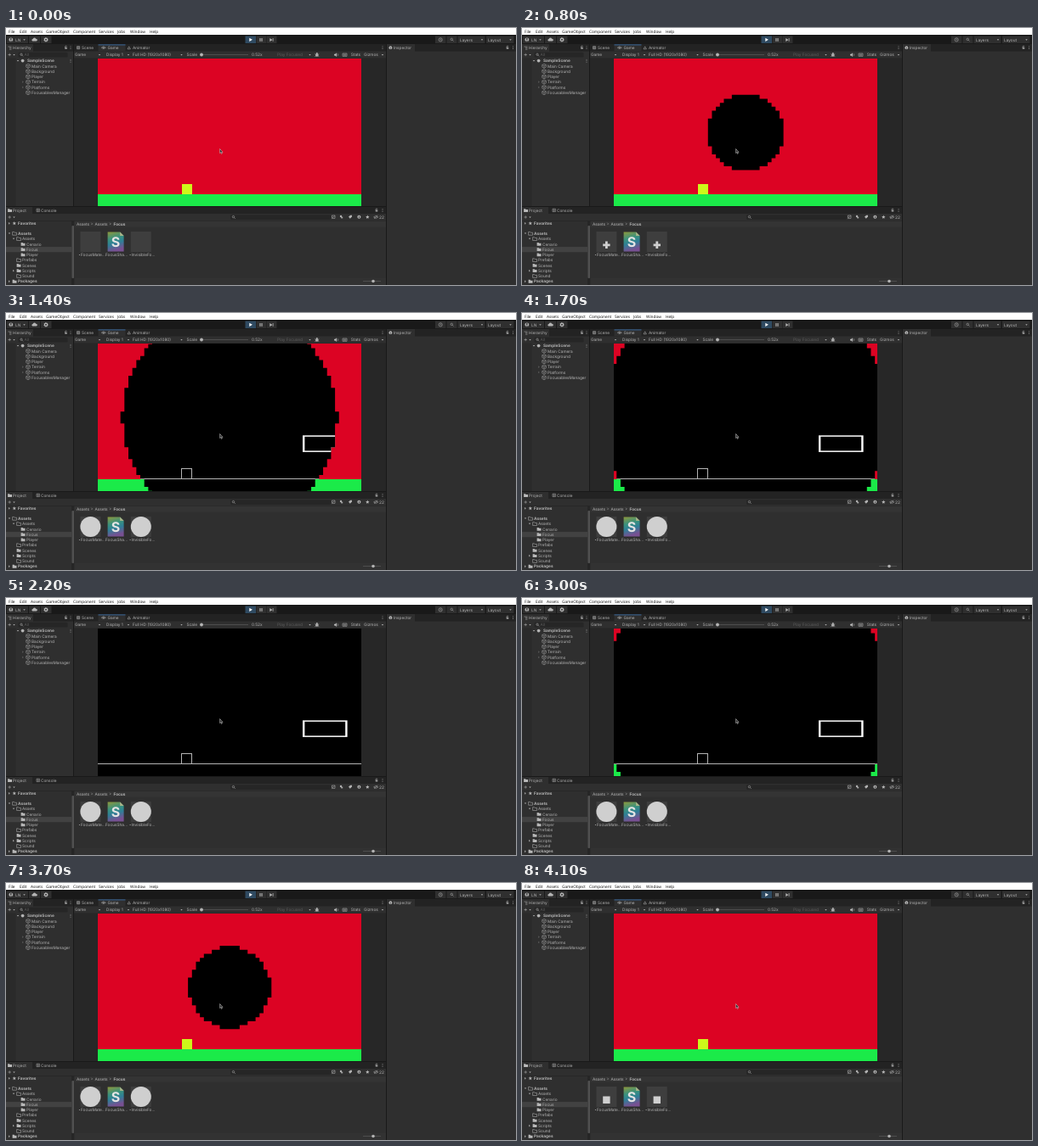
Animation of 600 by 303 pixels, one loop 4.2 s. Source, as an HTML page:

```html
<!DOCTYPE html>
<html lang="en">
<head>
<meta charset="utf-8">
<style>
  html, body { margin: 0; width: 100%; height: 100%; overflow: hidden; background: #191919; }
  svg { display: block; width: 600px; height: 303px; font: 4.75px Inter, sans-serif; fill: #b4b4b4; text-rendering: geometricPrecision; }
  .menu { font-family: "Open Sans", sans-serif; fill: #111; }
  .bold { font-weight: 700; }
  .dim { fill: #5c5c5c; }
  .line { fill: none; stroke: #a8a8a8; stroke-width: .6; }
</style>
</head>
<body>
<svg id="stage" viewBox="0 0 600 303" xmlns="http://www.w3.org/2000/svg"></svg>
<script>
const PANEL = '#2f2f2f', STRIP = '#232323', FIELD = '#262626', BUTTON = '#2f2f2f';

const rect = (x, y, w, h, fill, extra = '') =>
  `<rect x="${x}" y="${y}" width="${w}" height="${h}" fill="${fill}" ${extra}/>`;
const text = (x, y, label, cls = '') => `<text x="${x}" y="${y}" class="${cls}">${label}</text>`;
const path = (d, extra = 'class="line"') => `<path d="${d}" ${extra}/>`;
const dot = (x, y, r, extra = '') => `<circle cx="${x}" cy="${y}" r="${r}" ${extra}/>`;
const down = (x, y) => path(`M${x - 1.2} ${y - .7}h2.4l-1.2 1.5z`, '');
const right = (x, y, cls = '') => path(`M${x - .8} ${y - 1.4}v2.8l1.5-1.4z`, `class="${cls}"`);
const chevron = (x, y) => path(`M${x - .6} ${y - 1.2}l1.2 1.2l-1.2 1.2`);
const menuDots = (x, y) => [-1.5, 0, 1.5].map(d => dot(x, y + d, .45)).join('');
const lock = (x, y) => rect(x - 1.3, y - .3, 2.6, 2, '#a0a0a0') + path(`M${x - .9} ${y}v-1a.9 .9 0 0 1 1.8 0`);
const lens = (x, y) => dot(x, y, 1.2, 'class="line"') + path(`M${x + .9} ${y + .9}l1.3 1.3`);
const cube = (x, y) =>
  path(`M${x} ${y - 2.5}l2.3 1.2v2.6l-2.3 1.2l-2.3 -1.2v-2.6zm-2.3 1.2l2.3 1.2l2.3 -1.2m-2.3 1.2v2.6`, 'class="line" style="stroke-width:.5"');
const folder = (x, y, open) =>
  path(`M${x - 2.4} ${y - 1.9}h1.9l.7 .8h2.3v3h-4.9z`, open ? 'class="line"' : 'fill="#b8b8b8"');
const star = (x, y) => path(`M${x} ${y - 2.2}l.6 1.5 1.6 .1-1.2 1 .4 1.6-1.4-.9-1.4 .9 .4-1.6-1.2-1 1.6-.1z`, '');
const gear = (x, y) => dot(x, y, 1.6, 'fill="none" stroke="#bcbcbc" stroke-width="1.2"') +
  dot(x, y, 2.3, 'fill="none" stroke="#bcbcbc" stroke-width=".7" stroke-dasharray=".9 .9"');

function topBars() {
  const menu = [[3, 'File'], [16, 'Edit'], [29, 'Assets'], [47, 'GameObject'], [79, 'Component'],
    [109, 'Services'], [131, 'Jobs'], [146, 'Window'], [169, 'Help']];
  return rect(0, 0, 600, 8, '#fff') + menu.map(([x, s]) => text(x, 5.8, s, 'menu')).join('') +
    rect(1, 9.5, 25, 8.5, BUTTON) + dot(5.8, 13.8, 2.4) + dot(5.8, 13, .9, `fill="${BUTTON}"`) +
    path('M4.3 15.4q1.5-1.6 3 0z', `fill="${BUTTON}"`) + text(11, 15.6, 'LN') + down(21.5, 14) +
    rect(27, 9.5, 13, 8.5, BUTTON) +
    path('M31.2 15.5a1.3 1.3 0 0 1 .3-2.5a2 2 0 0 1 3.7-.3a1.4 1.4 0 0 1 .4 2.8z', '') +
    rect(41, 9.5, 12.5, 8.5, BUTTON) + gear(47, 13.8) +
    rect(281.5, 9.5, 12.5, 8.5, '#2f4a61') + path('M286.3 11.7v4.2l3.6-2.1z', 'fill="#fff"') +
    rect(294.5, 9.5, 11.5, 8.5, BUTTON) + rect(298.4, 12, 1.1, 3.8, '#b4b4b4') + rect(300.5, 12, 1.1, 3.8, '#b4b4b4') +
    rect(306.5, 9.5, 12, 8.5, BUTTON) + path('M310.3 11.9v4l3.2-2z', '') + rect(313.7, 12, .8, 3.8, '#b4b4b4') +
    rect(505, 9.5, 12.5, 8.5, BUTTON) + dot(511.2, 13.8, 2.1, 'class="line"') + path('M511.2 12.5v1.5h1.1') +
    rect(518.5, 9.5, 12, 8.5, BUTTON) + lens(524.3, 13.3) +
    rect(531.5, 9.5, 32, 8.5, BUTTON) + text(534, 15.5, 'Layers') + down(560, 14) +
    rect(565, 9.5, 32.5, 8.5, BUTTON) + text(567, 15.5, 'Layout') + down(593.5, 14);
}

function hierarchy() {
  const items = ['Main Camera', 'Background', 'Player', 'Terrain', 'Platforms', 'FocusablesManager'];
  return rect(0, 19, 79, 191, PANEL) + rect(32, 19, 47, 8.5, STRIP) + rect(0, 35.5, 11.5, 174.5, '#2a2a2a') +
    path('M2.5 22h4m-2.5 1.6h2.5m-2.5 1.6h2.5') + text(8, 25.2, 'Hierarchy') + lock(70.5, 23) + menuDots(76, 23.2) +
    path('M2.5 31.5h3.4m-1.7-1.7v3.4') + down(9.5, 31.6) +
    rect(14.5, 28.8, 58, 5.6, FIELD, 'rx="1.2"') + lens(18, 31.2) + text(21.5, 33.2, 'All', 'dim') +
    down(14, 38.7) + dot(19.6, 38.6, 1.9) + text(25, 40.3, 'SampleScene', 'bold') +
    menuDots(76, 38.7) +
    items.map((s, i) => {
      const y = 44.8 + i * 6.27;
      return cube(26, y) + text(30, y + 1.7, s) + (i === 3 || i === 4 ? right(20, y, 'dim') : '');
    }).join('');
}

function gameToolbar() {
  return rect(80, 19, 367, 191, '#272727') + rect(80, 19, 367, 8.5, STRIP) + rect(108.5, 19.5, 32, 8, PANEL) +
    rect(108.5, 19.5, 32, .8, '#3a72b0') + rect(80, 27.5, 367, 8, PANEL) +
    path('M83.5 21.6h3.2v3.2h-3.2zm0 1.6h3.2m-1.6-1.6v3.2') + text(89, 25.2, 'Scene') +
    path('M112.3 23.2q2.3-2.8 5 0q-2.7 2.8-5 0z') + dot(114.8, 23.2, .8) + text(119.5, 25.2, 'Game') +
    path('M143 24.8l1.7-3 1.7 3z') + text(149, 25.2, 'Animator') + menuDots(443, 23.2) +
    text(81, 33, 'Game') + down(110, 31.6) + text(118, 33, 'Display 1') + down(144, 31.6) +
    text(149, 33, 'Full HD (1920x1080)') + down(206.5, 31.6) + text(212.5, 33, 'Scale') +
    rect(228, 31.1, 57, .8, '#565656') + dot(230, 31.5, 1.9) + text(289, 33, '0.52x') +
    text(319, 33, 'Play Focused', 'dim') + down(357.5, 31.6) +
    dot(365.8, 32, 1.8) + dot(365.8, 29.9, 1) + path('M363.3 30.6l5 3m0-3l-5 3') +
    path('M386 30.7h1.3l1.8-1.5v4.8l-1.8-1.5h-1.3z', '') + path('M390.2 30.3q1 1.2 0 2.5') +
    path('M396 30h5v3.3h-5zm.8 1.2h3.4m-3.4 1h3.4') + text(405.8, 33, 'Stats') + text(421, 33, 'Gizmos') + down(443, 31.6);
}

const inspector = () => rect(448, 19, 152, 284, PANEL) + rect(481, 19, 119, 8.5, STRIP) +
  dot(452.4, 23.2, 1.9) + rect(452.1, 22.8, .7, 1.6, PANEL) + text(456, 25.2, 'Inspector') +
  lock(590, 23) + menuDots(596.5, 23.2);

function project() {
  // [label, depth, arrow, open folder]
  const tree = [['Assets', 0, down, 1], ['Assets', 1, down, 1], ['Cenario', 2], ['Focus', 2], ['Player', 2],
    ['Prefabs', 1, null, 1], ['Scenes', 1], ['Scripts', 1, right], ['Sound', 1, null, 1], ['Packages', 0, right]];
  const rows = tree.map(([label, depth, arrow, open], i) => {
    const x = 10 + depth * 5, y = 242.3 + i * 6.27;
    return (i === 3 ? rect(0, y - 3.1, 77, 6.2, '#424242') : '') + (arrow ? arrow(x - 6, y) : '') +
      folder(x, y, open) + text(x + 4, y + 1.7, label, depth ? '' : 'bold');
  }).join('');
  return rect(0, 211, 447, 92, PANEL) + rect(31, 211, 416, 8, STRIP) +
    folder(4.5, 215.2) + text(8, 217, 'Project') + path('M36 213.2h3.4v3.4h-3.4zm.8 1.2h1.8m-1.8 1h1.8') +
    text(41, 217, 'Console') + lock(436, 214.8) + menuDots(443, 215) +
    path('M2.5 223h3.4m-1.7-1.7v3.4') + down(9.5, 223.1) +
    rect(264, 220.2, 118, 5.7, FIELD, 'rx="1.2"') + lens(267.5, 222.6) +
    path('M383.5 221h3.5v3.4h-3.5zm.4 3l2.7-2.6') + dot(394, 222, 1.2) + rect(394.2, 222.6, 2, 1.8, '#aaa') +
    path('M403 222.6l2.2-1.8h1.8v1.8l-2.2 2.2z', '') + dot(415.4, 222.8, 2) + rect(415, 221.8, .8, 2.2, PANEL) +
    star(425.3, 222.8) + path('M432.6 222.9q2.5-3 5.2 0q-2.7 3-5.2 0zm.4 2l4.2-4') + text(439, 224.6, '22') +
    rect(0, 227, 447, .6, '#222') + right(4, 230.3) + star(9.8, 230.2) + text(14, 232, 'Favorites', 'bold') + rows +
    rect(77, 227.6, 3.5, 75.4, FIELD) + rect(77.4, 233, 2.7, 62, '#505050', 'rx="1"') +
    rect(80.5, 227.6, 366.5, 7.2, '#343434') + text(83, 232.5, 'Assets') + chevron(101, 230.9) +
    text(104.5, 232.5, 'Assets') + chevron(122.7, 230.9) + text(126.5, 232.5, 'Focus', 'bold') +
    rect(80.5, 294.5, 366.5, 8.5, '#323232') +
    rect(420, 298.1, 21, .8, '#565656') + dot(432, 298.5, 1.8);
}

function thumbnails() {
  const preview = x => rect(x - 12, 240, 24, 24, '#3e3e3e') +
    dot(x, 251.9, 12, `fill="#cfcfcf" clip-path="url(#preview${x})"`);
  return preview(99.4) + preview(158.8) +
    path('M119.6 240.5h14.5l4.5 4.5v18.5h-19z', 'fill="url(#page)"') + path('M134.1 240.5v4.5h4.5z', 'fill="#a9b48a"') +
    '<text x="129" y="257.6" font-size="16" font-weight="700" fill="#e4e4e4" text-anchor="middle">S</text>' +
    dot(86.5, 267.5, .6) + text(88, 269.2, 'FocusMate...') + text(117, 269.2, 'FocusSha...') +
    dot(146.1, 267.5, .6) + text(147.6, 269.2, 'InvisibleFo...');
}

function gameView() {
  const frame = (x, y, w, h, sx, sy, color) => rect(x, y, w, h, color) + rect(x + sx, y + sy, w - 2 * sx, h - 2 * sy, '#000');
  return '<g shape-rendering="crispEdges">' + rect(108, 36, 310, 174, '#dc0323') +
    rect(108, 196, 310, 14, '#1bea49') + rect(207, 184, 12, 12, '#cdf81a') +
    '<g clip-path="url(#focus)">' + rect(108, 36, 310, 174, '#000') +
    frame(206, 183, 13, 13, 1, 1, '#b4b4b4') + rect(108, 195, 310, 1, '#b4b4b4') +
    '<g shape-rendering="auto">' + frame(349, 144.3, 52.6, 19.6, 2.4, 1.5, '#fff') + '</g></g></g>' +
    path('M251.6 142.5v5l1.1-.9 .8 1.8 .8-.4-.8-1.7h1.5z', 'fill="#222" stroke="#ddd" stroke-width=".5"');
}

const clip = id => `<clipPath id="${id}"><path shape-rendering="crispEdges"/></clipPath>`;
const stage = document.getElementById('stage');
stage.innerHTML = '<defs>' + clip('focus') + clip('preview99.4') + clip('preview158.8') +
  `<linearGradient id="page" x2=".25" y2="1"><stop stop-color="#8f993c"/><stop offset=".4" stop-color="#38917f"/>
   <stop offset=".65" stop-color="#2f7f97"/><stop offset="1" stop-color="#775092"/></linearGradient></defs>` +
  rect(0, 8, 600, 295, '#191919') + topBars() + hierarchy() + gameToolbar() + inspector() + project() + thumbnails() + gameView();

// Pixelated disc: overlapping boxes, one per row pair; radius is in cells.
function disc(cx, cy, cell, radius) {
  let d = 'M0 0';
  for (let j = 0; j < radius; j++) {
    const i = Math.ceil(Math.sqrt(radius * radius - j * j)) - 1;
    const w = (2 * i + 1) * cell, h = (2 * j + 1) * cell;
    d += `M${cx - w / 2} ${cy - h / 2}h${w}v${h}h${-w}z`;
  }
  return d;
}

const setClip = (id, ...args) => document.getElementById(id).firstChild.setAttribute('d', disc(...args));
const pulse = (t, start, grow, end, shrink, max) =>
  Math.max(0, Math.min((t - start) * grow, (end - t) * shrink, max));

function draw(now) {
  const t = Math.floor(now % 4200 / 100) * 100;
  const preview = pulse(t, 667, .009, 4236, .0125, 9);
  setClip('focus', 263.2, 123.2, 4.675, pulse(t, 464, .02888, 3973, .0375, 40));
  for (const x of [99.4, 158.8]) setClip('preview' + x, x, 255.8, 2.8, preview);
  requestAnimationFrame(draw);
}
draw(0);
</script>
</body>
</html>
```
